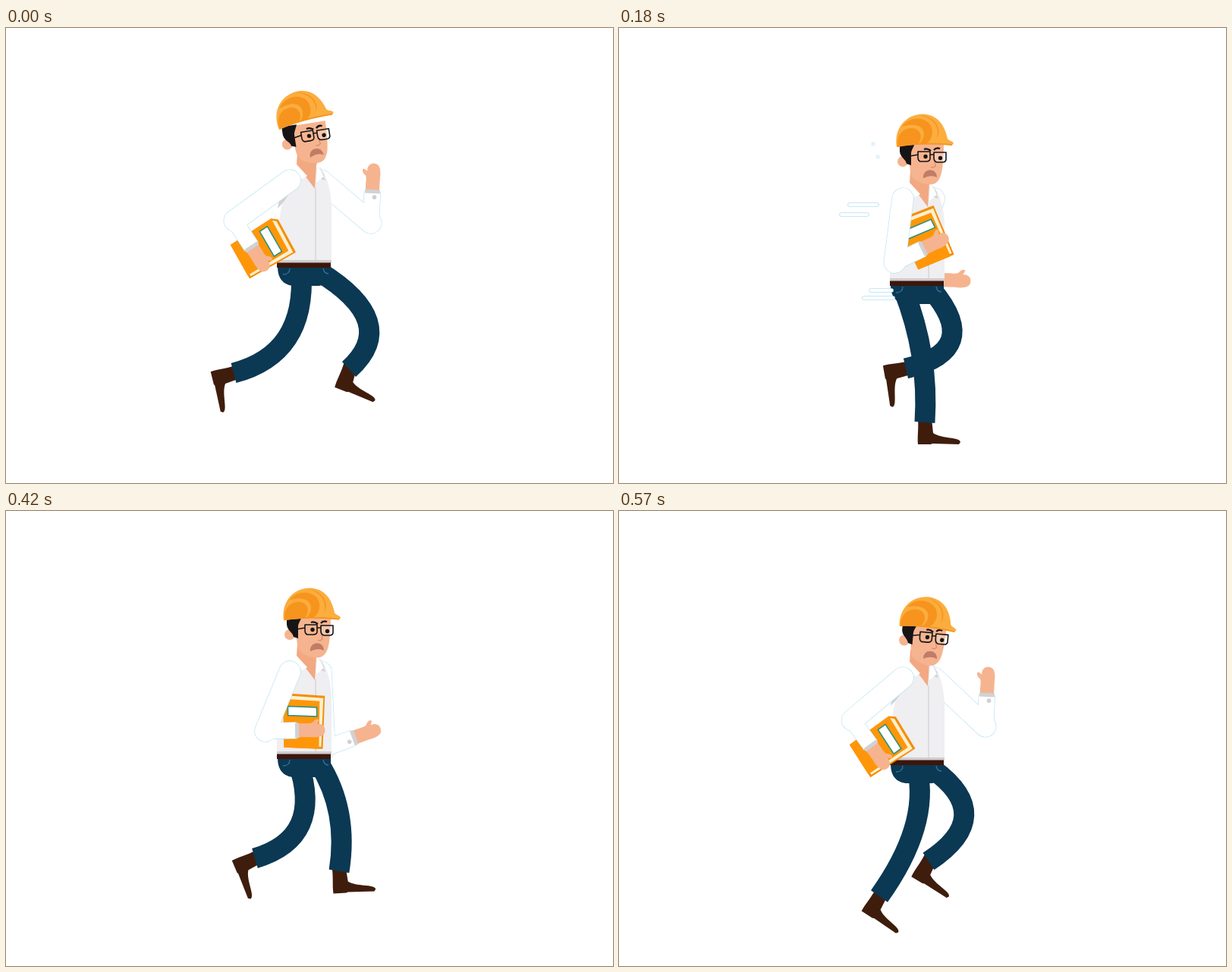
These frames come from a looping animation (800x600 px, 0.6 s). An HTML page with a canvas:

```html
<!DOCTYPE html>
<html>
<head>
<meta charset="utf-8">
<style>
  html, body { margin: 0; width: 100%; height: 100%; overflow: hidden; background: #fff; }
  canvas { display: block; }
</style>
</head>
<body>
<canvas id="stage" width="800" height="600"></canvas>
<script>
const ctx = document.getElementById('stage').getContext('2d');
const LOOP = 600, STEP = 30, BELT = 333;
const NAVY = '#0b3853', SKIN = '#f5b48f', SHOE = '#3f1d0d', ORANGE = '#ff9609',
      HAT = '#fbad3e', HAT_DARK = '#f7941e', EDGE = '#b4e0f2', GREY = '#d0d2d6', INK = '#171416';

// Each key: time, then the values to blend.
const belt = [[0, 309], [60, 313], [120, 323], [180, 333], [225, 336], [270, 331],
              [330, 310], [370, 311], [420, 320], [480, 333], [525, 336], [570, 328]];

// Head angle, extra hat angle
const headKeys = [[0, -9, -5], [120, -4, 0], [180, 0, 0], [270, 10, 5], [420, 0, 1], [480, 2, 0], [570, 5, 3]];

// Hand x, hand y from the belt, forearm angle
const nearArm = [[0, 335, -3, 57], [120, 402, -26, 4], [180, 419, -51, -26], [270, 418, -65, -38],
                 [420, 404, -31, -1], [480, 382, -15, 22], [570, 344, -2, 54]];
const farArm = [[0, 484, -114, -87], [120, 480, -36, -25], [180, 447, 0, 2], [270, 419, 5, 20],
                [420, 478, -28, -20], [480, 491, -63, -50], [570, 486, -106, -87]];

// Hip x, bend x, bend y, ankle x, ankle y, foot angle
const legA = [[0, 389, 396, 430, 300, 455, 76], [120, 414, 435, 442, 332, 432, 92],
              [180, 412, 480, 425, 378, 449, 80], [270, 385, 512, 375, 433, 463, 27],
              [330, 410, 515, 380, 454, 450, 20], [420, 412, 452, 395, 439, 475, -3],
              [480, 400, 403, 430, 402, 517, -1], [570, 393, 410, 414, 343, 508, 33]];
const legB = [[0, 412, 521, 388, 452, 450, 21], [120, 376, 402, 430, 418, 514, -6],
              [180, 375, 409, 432, 403, 520, 0], [270, 373, 386, 425, 343, 505, 27],
              [330, 385, 398, 428, 300, 453, 76], [420, 385, 419, 431, 328, 458, 67],
              [480, 405, 466, 430, 362, 462, 50], [570, 413, 499, 402, 408, 462, 31]];

// Speed lines: left, right, y
const streaks = [
  [[90, 350, 350, 233], [120, 322, 360, 233], [180, 304, 340, 233], [240, 293, 297, 233]],
  [[90, 345, 345, 246], [120, 303, 350, 246], [180, 293, 327, 246], [240, 285, 289, 246]],
  [[100, 362, 364, 346], [120, 350, 362, 346], [180, 332, 359, 346], [270, 329, 332, 346]],
  [[100, 360, 364, 356], [120, 354, 360, 356], [180, 323, 361, 356], [270, 303, 323, 356]],
  [[100, 350, 360, 142], [120, 339, 352, 146], [180, 335, 335, 153]],
  [[100, 362, 372, 146], [120, 347, 364, 152], [180, 341, 341, 170]]
];

// Smooth blend through the keys
function at(keys, t) {
  let i = 0;
  while (i < keys.length - 2 && t >= keys[i + 1][0]) i++;
  const a = keys[i], b = keys[i + 1], p = keys[i - 1] || a, n = keys[i + 2] || b;
  const span = b[0] - a[0], u = (t - a[0]) / span;
  return a.slice(1).map((v, j) => {
    const k = j + 1;
    const m0 = (b[k] - p[k]) / (b[0] - p[0]) * span;
    const m1 = (n[k] - v) / (n[0] - a[0]) * span;
    const d = b[k] - v;
    return v + u * m0 + u * u * (3 * d - 2 * m0 - m1) + u * u * u * (m0 + m1 - 2 * d);
  });
}

const rad = deg => deg * Math.PI / 180;

function fill(d, color) {
  ctx.fillStyle = color;
  ctx.fill(new Path2D(d));
}

function line(d, color, width, cap = 'butt') {
  ctx.strokeStyle = color;
  ctx.lineWidth = width;
  ctx.lineCap = cap;
  ctx.stroke(new Path2D(d));
}

function dot(x, y, r, color) {
  ctx.fillStyle = color;
  ctx.beginPath();
  ctx.arc(x, y, r, 0, 7);
  ctx.fill();
}

function placed(x, y, deg, draw) {
  ctx.save();
  ctx.translate(x, y);
  ctx.rotate(rad(deg));
  draw();
  ctx.restore();
}

function leg(keys, t, y) {
  const [hip, bx, by, ax, ay, foot] = at(keys, t);
  placed(ax, ay, foot, () =>
    fill('M-9-5L9-5L11 14C22 22 46 19 47 26L45 29L10 28L8 29H-9C-10 18-8 10-9-5Z', SHOE));
  line(`M${hip} ${y + 12}Q${bx} ${by} ${ax} ${ay}`, NAVY, 27);
}

function book() {
  fill('M-38-42L-32-49L17-45L13 25L-38 22Z', '#f58d05');
  fill('M-35-42L-31-46L15-42L11 22L8 22Z', '#fdf1cf');
  fill('M-38-42L10-38L8 25L-38 22Z', ORANGE);
  const label = 'M-32-32L6-30V-18L-32-20Z';
  fill(label, '#fff');
  line(label, '#23907c', 1.5);
}

function arm(keys, t, y, shoulder, far) {
  const [x, dy, deg] = at(keys, t), hy = y + dy;
  const reach = n => `${x - n * Math.cos(rad(deg))} ${hy - n * Math.sin(rad(deg))}`;
  const upper = `M${shoulder} ${y - 108}L${reach(62)}`, fore = `M${reach(62)}L${reach(21)}`;
  if (!far) placed(x, hy, deg, book);
  for (const [color, grow] of [[EDGE, 1.2], ['#fff', 0]]) {
    line(upper, color, 28 + grow, 'round');
    line(fore, color, 21 + grow);
    line(`M${reach(62)}L${reach(61)}`, color, 25 + grow, 'round');
  }
  placed(x, hy, deg, () => {
    fill('M-19-9C-10-10-5-8 0-10C3-14 7-16 9-13L6-8C14-9 18-3 16 3C15 9 5 10-4 9H-19Z', SKIN);
    fill('M-23-10H-18V10H-23Z', GREY);
    if (far) dot(-28, 3, 2.8, '#d5cdd3');
  });
}

function torso() {
  fill('M358 338H428C429 355 424 364 410 364H378C363 362 358 352 358 338Z', NAVY);
  line('M374 341C374 347 370 349 365 349M418 341C419 346 421 348 425 348', '#2f719c', 1.3);
  fill('M380 208C372 235 358 250 357 333H429V258C428 238 424 222 415 208Z', '#efeef1');
  fill('M379 208C372 228 361 240 358 262C370 250 380 237 379 208Z', GREY);
  fill('M384 188L383 204L407 236L409 205L413 194Z', '#f2a982');
  fill('M357 330H429V334H357Z', '#cfced1');
  line('M408 235V330', '#d6cfd3', 1.2);
  fill('M383 204L374 212L391 223L397 219Z', '#fff');
  fill('M410 206L409 228L420 219Z', '#fff');
  fill('M414 209L420 219L415 223L421 225Z', GREY);
  fill('M357 333.5H428V340H357Z', '#3d160b');
}

function hat() {
  fill('M366 157C362 131 379 114 400 113.500C419 114 429 127 433 146C435 149 440 149 441 152L439 154.500C415 153 385 153 366 157Z', HAT);
  fill('M367 155C366 141 374 132 386 132C398 133 401 144 394 153Z', HAT_DARK);
  fill('M373 130C385 113 412 118 413 136C413 145 409 151 403 153H396C407 142 404 121 373 130Z', HAT_DARK);
  fill('M397 115C416 119 423 132 419 146C427 132 415 116 397 115Z', HAT_DARK);
  line('M367 156C388 152 416 152 439 154', HAT_DARK, 1.8);
}

function head([turn, tip]) {
  ctx.save();
  ctx.translate(399, 198 + turn * .3);
  ctx.rotate(rad(turn));
  ctx.translate(-399, -198);
  dot(374, 176, 7, SKIN);
  fill('M380 153H428C428 170 427 181 425 191C422 204 415 208 406 206C395 204 386 200 384 190Z', SKIN);
  fill('M370 152H390C388 158 385 161 385 166V181L379 179C378 173 371 171 370 163Z', INK);
  line('M415 170L417 182Q414 185 411 183', '#d98d6c', 1.3);
  fill('M401 198C400 184 419 184 419 197C413 194 407 195 401 198Z', '#c17c68');
  fill('M415 164H430L431 177H417Z', 'rgba(255,255,255,.25)');
  dot(404, 169.500, 2.700, INK);
  dot(423.500, 171.500, 2.700, INK);
  line('M402 160Q406 158 411 162M415 161Q418 157 423 159', INK, 2.3);
  ctx.lineJoin = 'round';
  line('M394 163H410V173Q409 176 405 176H397Q394 175 394 170ZM415 164H431L431 174Q430 177 427 177H419Q415 176 415 171ZM410 167H415M383 169L394 167', INK, 1.6);
  ctx.translate(403, 155 + tip);
  ctx.rotate(rad(tip));
  ctx.translate(-403, -155);
  hat();
  ctx.restore();
}

function streak(keys, t, i) {
  if (t < keys[0][0] || t > keys[keys.length - 1][0]) return;
  const [l, r, y] = at(keys, t), tilt = i > 3 ? (r - l) * .25 : 0;
  const d = `M${l} ${y}L${r + .1} ${y - tilt}`, width = i > 3 ? 3 : 4;
  line(d, EDGE, width + 1.5, 'round');
  line(d, '#fff', width, 'round');
}

function draw(now) {
  const t = Math.floor(now % LOOP / STEP) * STEP;
  const [y] = at(belt, t);
  ctx.fillStyle = '#fff';
  ctx.fillRect(0, 0, 800, 600);
  arm(farArm, t, y, 415, true);
  leg(legA, t, y);
  leg(legB, t, y);
  ctx.save();
  ctx.translate(0, y - BELT);
  torso();
  head(at(headKeys, t));
  ctx.restore();
  streaks.forEach((keys, i) => streak(keys, t, i));
  arm(nearArm, t, y, 374, false);
  requestAnimationFrame(draw);
}
requestAnimationFrame(draw);
</script>
</body>
</html>
```
